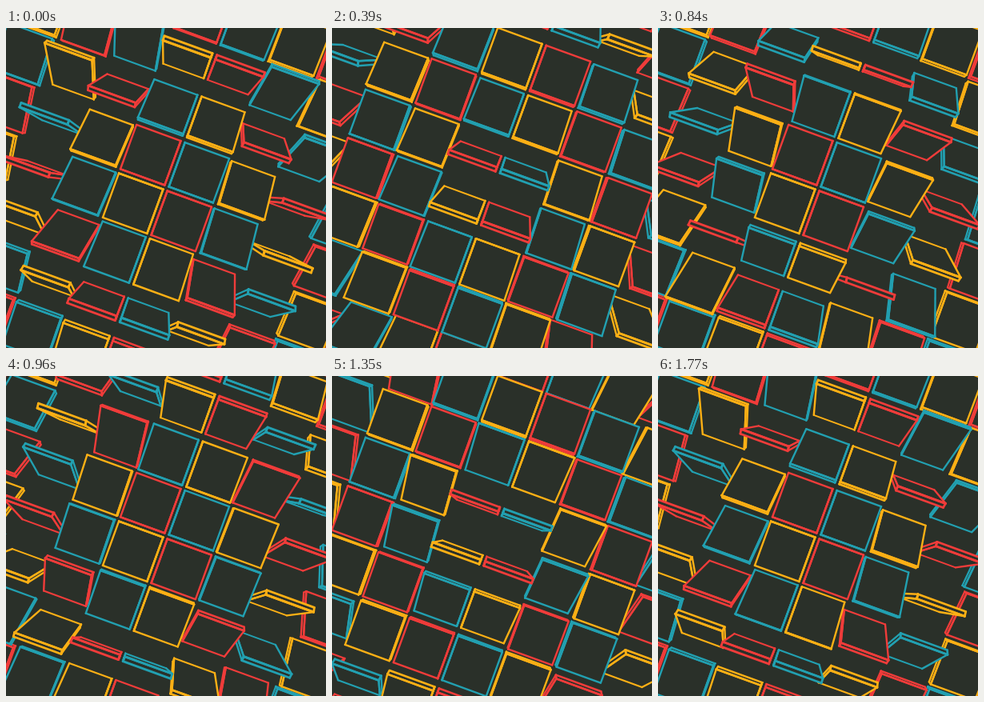
Animation of 400 by 400 pixels, one loop 1800 ms. Source, as an HTML page with a canvas:

```html
<!DOCTYPE html>
<html lang="en">
<head>
<meta charset="utf-8">
<title>Flipping tiles</title>
<style>
  html, body { margin: 0; width: 100%; height: 100%; overflow: hidden; background: #2a3029; }
  canvas { display: block; width: 400px; height: 400px; }
</style>
</head>
<body>
<canvas id="stage"></canvas>
<script>
const SIZE = 400, LOOP = 1800, WAVE = LOOP / 2;
const STEP = 64, HALF = 29.2, DEPTH = 2.7, CAMERA = 346, TILT = 20 * Math.PI / 180;
const FIRST_FLIP = 273, DELAY = 247, FLIP_TIME = 780;
const BACKGROUND = '#2a3029';
const COLORS = ['#f03c3a', '#22a0b1', '#fdb015'];
// Corner indices, clockwise seen from outside; bits are x, y, z.
const FACES = ['4576', '1023', '0154', '6732', '5137', '0462'].map(f => [...f].map(Number));

const canvas = document.getElementById('stage');
const ctx = canvas.getContext('2d');
const ratio = window.devicePixelRatio || 1;
canvas.width = canvas.height = SIZE * ratio;

const tiles = [];
for (let row = -5; row < 5; row++) {
  for (let col = -5; col < 5; col++) {
    const x = col + 0.5, y = row + 0.5;
    tiles.push({
      x: x * STEP, y: y * STEP, r: Math.hypot(x, y),
      color: COLORS[(col - row + 30) % 3]
    });
  }
}
// The camera is over the centre, so inner tiles cover outer ones.
tiles.sort((a, b) => b.r - a.r);

// Each wave turns a tile half a turn; alternate waves turn the other way.
function angleAt(time, r) {
  const local = time - FIRST_FLIP - DELAY * r;
  const wave = Math.floor(local / WAVE + 0.5);
  const p = Math.max(-0.5, Math.min(0.5, (local - wave * WAVE) / FLIP_TIME));
  const turn = Math.PI / 2 * (1 + Math.sin(Math.PI * p));
  return wave % 2 ? turn : -turn;
}

function corners(tile, angle) {
  const c = Math.cos(angle), s = Math.sin(angle);
  return Array.from({ length: 8 }, (_, i) => {
    const x = i & 1 ? HALF : -HALF;
    const y = i & 2 ? HALF : -HALF;
    const z = i & 4 ? DEPTH : -DEPTH;
    const scale = CAMERA / (CAMERA - (z * c - y * s));
    return { x: (tile.x + x) * scale, y: (tile.y + y * c + z * s) * scale, scale };
  });
}

function facesCamera([a, b, c, d]) {
  return (c.x - a.x) * (d.y - b.y) - (c.y - a.y) * (d.x - b.x) > 0;
}

function drawTile(tile, time) {
  const points = corners(tile, angleAt(time, tile.r));
  const visible = FACES.map(face => face.map(i => points[i])).filter(facesCamera);
  for (const face of visible) {
    ctx.beginPath();
    face.forEach(p => ctx.lineTo(p.x, p.y));
    ctx.closePath();
    ctx.fill();
  }
  ctx.strokeStyle = tile.color;
  for (const face of visible) {
    face.forEach((a, i) => {
      const b = face[(i + 1) % 4];
      ctx.lineWidth = 2.35 * ((a.scale + b.scale) / 2) ** 2;
      ctx.beginPath();
      ctx.moveTo(a.x, a.y);
      ctx.lineTo(b.x, b.y);
      ctx.stroke();
    });
  }
}

function draw(time) {
  ctx.setTransform(ratio, 0, 0, ratio, 0, 0);
  ctx.fillStyle = BACKGROUND;
  ctx.fillRect(0, 0, SIZE, SIZE);
  ctx.translate(SIZE / 2, SIZE / 2);
  ctx.rotate(TILT);
  ctx.lineCap = 'round';
  tiles.forEach(tile => drawTile(tile, time));
}

const start = performance.now();
function tick() {
  draw((performance.now() - start) % LOOP);
  requestAnimationFrame(tick);
}
tick();
</script>
</body>
</html>
```
